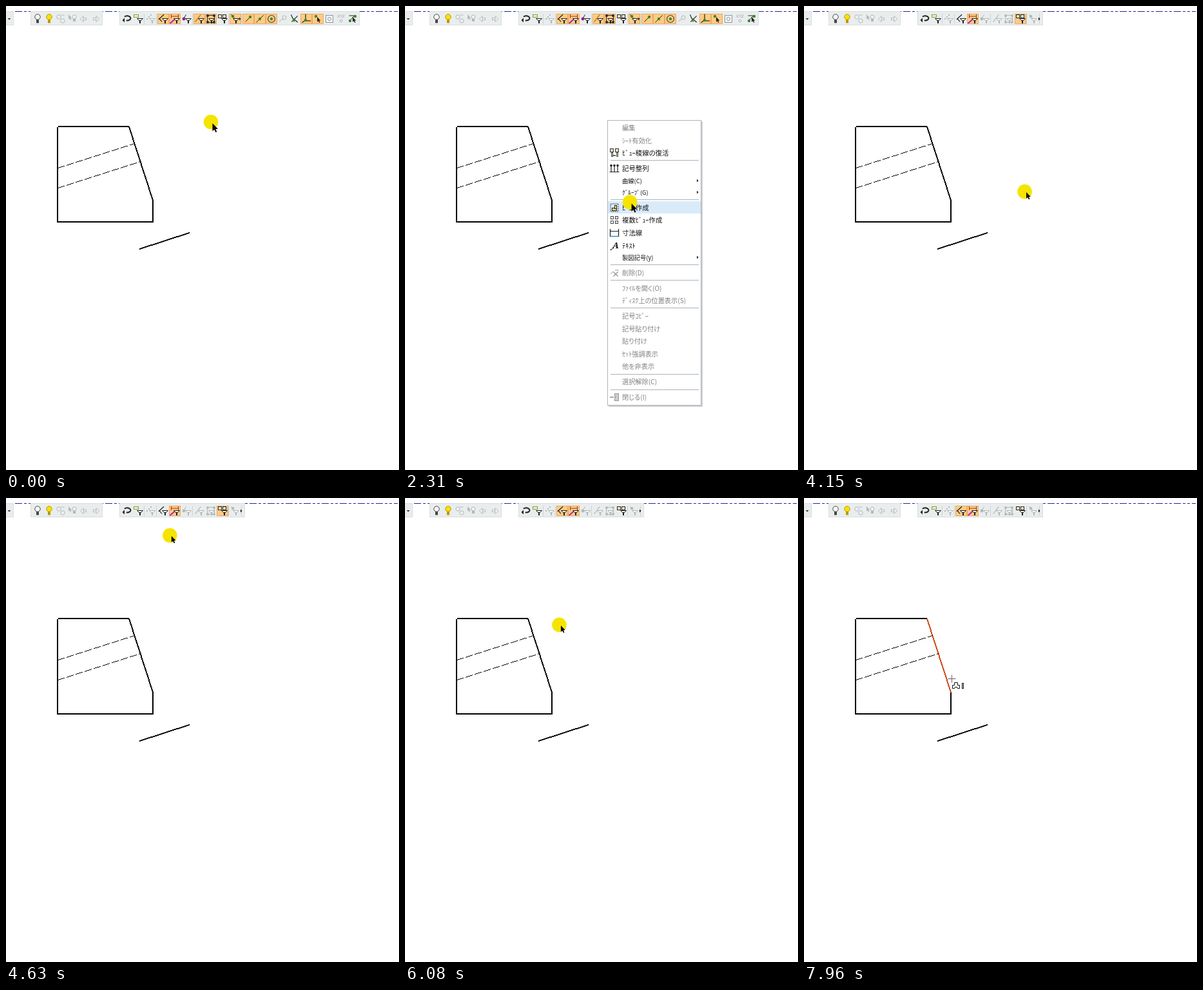
An HTML page with a canvas for the animation above (7990 ms loop, 610x720 px).

```html
<!DOCTYPE html>
<html lang="ja">
<head>
<meta charset="utf-8">
<style>
html, body { margin: 0; width: 100%; height: 100%; overflow: hidden; background: #fff; }
canvas { position: absolute; left: 0; top: 0; }
#menu { position: absolute; left: 314px; top: 177px; width: 144px; height: 441px; padding-top: 1px; box-sizing: content-box;
  background: #fff; border: 1px solid #aeb4ba; box-shadow: 2px 2px 0 #ccd0d3; height: 440px;
  font: 10.4px/19.6px "Noto Sans CJK JP", "Noto Sans CJK", sans-serif; font-feature-settings: "palt"; color: #111; }
#menu div { height: 19.6px; padding-left: 22px; white-space: pre; }
#menu .off { color: #808080; font-size: 10.2px; }
#menu .sub { height: 18.4px; line-height: 18.4px; font-size: 9.3px; }
#menu hr { width: 137px; height: 1px; margin: 1.6px 0 1.7px 4px; border: 0; background: #aab3bb; }
</style>
</head>
<body>
<canvas id="scene" width="610" height="720"></canvas>
<div id="menu"></div>
<canvas id="over" width="610" height="720"></canvas>
<script>
const $ = id => document.getElementById(id);
const scene = $('scene').getContext('2d'), over = $('over').getContext('2d'), menu = $('menu');
const LOOP = 7990, INK = '#222', GREY = '#b2b8b8', GREEN = '#3a8a28';
let g = scene;

// ---------- drawing helpers ----------
function box(x, y, w, h, fill, edge) {
  if (fill) { g.fillStyle = fill; g.fillRect(x, y, w, h); }
  if (edge) { g.strokeStyle = edge; g.lineWidth = 1; g.strokeRect(x + .5, y + .5, w - 1, h - 1); }
}
function disc(x, y, r, fill, edge, w = 1) {
  g.beginPath();
  g.arc(x, y, r, 0, 7);
  if (fill) { g.fillStyle = fill; g.fill(); }
  if (edge) { g.strokeStyle = edge; g.lineWidth = w; g.stroke(); }
}
// straight stroke centred on x, y; the angle is in degrees, rising to the right
function seg(x, y, len, deg, color, w = 1) {
  const a = deg * Math.PI / 180, dx = Math.cos(a) * len / 2, dy = -Math.sin(a) * len / 2;
  g.beginPath();
  g.moveTo(x - dx, y - dy);
  g.lineTo(x + dx, y + dy);
  g.strokeStyle = color; g.lineWidth = w; g.stroke();
}
// triangle pointing along (dx, dy)
function tri(x, y, r, dx, dy, fill, edge) {
  g.beginPath();
  g.moveTo(x + dx * r, y + dy * r);
  g.lineTo(x - dy * r, y + dx * r);
  g.lineTo(x + dy * r, y - dx * r);
  g.closePath();
  g.fillStyle = fill; g.fill();
  if (edge) { g.strokeStyle = edge; g.lineWidth = 1; g.stroke(); }
}
function arrow(x, y, s, fill, edge) {
  g.save();
  g.translate(x, y);
  g.scale(s, s);
  const p = new Path2D('M0 0V13L3 10.4L5.2 15L7.3 14L5.2 9.6L9 9.4Z');
  g.fillStyle = fill; g.fill(p);
  if (edge) { g.strokeStyle = edge; g.lineWidth = 1; g.stroke(p); }
  g.restore();
}
// hard-edged line, one step per pixel, optionally dashed
function stair(x0, y0, x1, y1, w, color, on = 1, period = 1) {
  const dx = x1 - x0, dy = y1 - y0, steep = Math.abs(dy) > Math.abs(dx);
  const n = Math.max(Math.abs(dx), Math.abs(dy)), back = w - 1;
  g.fillStyle = color;
  for (let i = 0; i <= n; i++) {
    if (i % period >= on) continue;
    const x = Math.round(x0 + dx * i / n), y = Math.round(y0 + dy * i / n);
    if (steep) g.fillRect(x - back, y, w, 1);
    else g.fillRect(x, y - back, 1, w);
  }
}

// ---------- toolbar icons, centred on x, 20 ----------
function funnel(x, c) {
  tri(x + 3, 19.5, 4.5, 0, 1, '#f6f6f0', c);
  seg(x + 3, 24.5, 5, 90, c, 2);
}
function bulb(x, fill, c, r = 4.2) {
  disc(x, 17, r, fill, c);
  box(x - 2, 17 + r, 4, r + 1, c);
}
const dot = (x, y, c) => disc(x, y, 2.2, c === GREY ? c : GREEN);
const frameBox = (x, y, s, c, fill) => box(x - s / 2, y - s / 2, s, s, fill, c);
function side(x, dir) {
  box(x - 4 + (dir < 0 ? 2 : 0), 18, 6, 4, '#f6f6f6', GREY);
  tri(x + dir, 20, 4.5, dir, 0, '#f6f6f6', GREY);
}
const icon = {
  bulb: x => bulb(x, '#f8fafa', '#444'),
  lit: x => bulb(x, '#ffe000', '#b59a00'),
  swap(x, c) { for (const d of [-3, 3]) disc(x + d, 20 + d, 3.2, '#eef0f0', c); seg(x + 3, 14, 5, 0, c); },
  pick(x, c) { arrow(x - 6, 13, .6, c); bulb(x + 3, '#f4f4f4', c, 3); },
  left: x => side(x, -1),
  right: x => side(x, 1),
  back(x, c) {
    g.beginPath();
    g.ellipse(x + 1, 19, 5.5, 3.5, 0, -2.4, 1.8);
    g.strokeStyle = c; g.lineWidth = 2; g.stroke();
    tri(x - 3, 22, 3.5, -1, 0, c);
  },
  tag(x, c) { box(x - 7, 13, 8, 5, '#f2f2c0', '#7f9a50'); funnel(x, c); },
  dots(x, c) { for (let i = 0; i < 3; i++) box(x - 6 + i * 3, 19 - i * 3, 2, 2, c); funnel(x, c); },
  line(x, c) { seg(x - 3, 17, 11, 42, c, 1.2); seg(x - 4, 22, 6, -50, c, 1.2); funnel(x, c); },
  dim(x, c) {
    seg(x, 16, 11, 0, '#a03010');
    for (const d of [-5.5, 5.5]) seg(x + d, 16, 6, 90, '#a03010');
    seg(x - 4, 24, 9, 40, '#b020c0', 2);
    funnel(x, c);
  },
  arc(x, c) { disc(x - 4, 20, 2.4, c === GREY ? c : '#a01890'); seg(x - 2, 16, 6, 60, c); funnel(x, c); },
  slash(x, c) { seg(x - 2, 19, 14, 52, c === GREY ? c : '#a07800', 1.2); funnel(x, c); },
  group(x, c) {
    frameBox(x, 20, 12, c);
    for (const a of [-5, 5]) for (const b of [-5, 5]) frameBox(x + a, 20 + b, 3, c, c);
    funnel(x - 2, c);
  },
  boxes(x, c) { for (const d of [-4, 3]) frameBox(x + d, 16, 6, c, '#f8edc4'); funnel(x, c); },
  point(x, c) {
    seg(x - 4, 16, 8, -45, c);
    dot(x - 4, 16, c);
    funnel(x - 2, c);
    if (c !== GREY) tri(x + 6, 20, 2.5, 1, 0, c);
  },
  end(x, c) { seg(x, 20, 13, 45, c); dot(x + 3, 17, c); },
  mid(x, c) { seg(x, 20, 16, 45, c); dot(x, 20, c); },
  ring(x, c) { disc(x, 20, 5.5, null, '#444', 1.2); dot(x, 20, c); },
  curve(x, c) { disc(x + 2, 18, 3, null, c); seg(x - 3, 22, 7, 30, c); },
  cross(x, c) { seg(x - 3, 19, 12, -65, c, 1.2); seg(x, 20, 13, 45, c, 1.2); seg(x + 2, 23, 7, -40, c, 1.2); dot(x - 1, 21, c); },
  axis(x, c) { seg(x - 1, 18, 11, 90, c, 1.2); seg(x + 3, 23, 8, 0, c, 1.2); seg(x - 4, 24, 6, 35, c, 1.2); dot(x - 1, 22, c); },
  near(x, c) { dot(x - 3, 16, c); arrow(x - 1, 17, .6, c); },
  frame(x) { frameBox(x, 20, 12, '#8f9696', '#f4f6f6'); disc(x, 20, 2.5, null, '#8f9696'); },
  xyz(x, c) {
    g.fillStyle = '#9a9f9f'; g.font = '6px "DejaVu Sans", sans-serif'; g.textAlign = 'center';
    g.fillText('XYZ', x, 18);
    disc(x, 23, 2, null, c);
  },
  many(x, c) { seg(x, 15, 11, 0, c); seg(x - 1, 19, 12, 45, c); dot(x + 4, 16, c); dot(x - 4, 23, c); arrow(x, 17, .6, c); }
};

// name:modes in the full and the short bar; 1 lit, 0 plain, - grey; | is a divider
const TOOLS = ('back:00 tag:00 | dots:-- | line:10 dim:11 arc:0- | slash:1- group:1- boxes:01 | point:1- | ' +
  'end:1 mid:1 ring:1 curve:- cross:0 axis:1 near:1 frame:0 xyz:- many:0').split(' ');

function strip(x, w) { box(x, 8, w, 22, '#e9eded', '#d9dede'); }

function toolbar(t) {
  const short = t >= 3400;
  g.setLineDash([11, 3, 4, 3, 4, 3]);
  seg(311, 8.5, 594, 0, '#2222a4');
  g.setLineDash([]);
  strip(-2, 14); strip(38, 112); strip(176, short ? 195 : 373);
  tri(5, 19, 2.5, 0, 1, '#333');
  ['bulb', 'lit', 'swap', 'pick', 'left', 'right'].forEach((n, i) => icon[n](49 + i * 18, GREY));
  let pos = 187;
  for (const tool of TOOLS) {
    if (tool === '|') {
      seg(Math.floor(pos) - 8.5, 20, 16, 90, '#cdd3d3');
      pos += 1.85;
      continue;
    }
    const [name, modes] = tool.split(':'), x = Math.floor(pos);
    let mode = modes[short ? 1 : 0];
    if (!mode) break;
    if (name === 'line' && t >= 5460) mode = '1';
    if (name === 'boxes' && t >= 5580) mode = '0';
    if (mode === '1') box(x - 9, 12, 18, 16, '#ffcb85', '#e8a961');
    else if (name === 'line' && t >= 5130) box(x - 8, 12, 17, 16, '#fde3bd', '#e8b884');
    icon[name](x, mode === '-' ? GREY : INK);
    pos += 18;
  }
  if (short) tri(364, 20, 2.5, 1, 0, '#111');
}

function drawing(t) {
  box(79, 188, 2, 148, '#000');
  box(81, 186, 110, 2, '#000');
  box(79, 334, 150, 2, '#000');
  box(227, 302, 2, 34, '#000');
  stair(191, 187, 228, 301, 2, t < 6930 ? '#000' : t < 7530 ? '#e0662a' : '#c94a16');
  stair(207, 377, 284, 352, 2, '#000');
  stair(80, 251, 199, 213, 1, '#000', 11, 14);
  stair(80, 282, 208, 241, 1, '#000', 11, 14);
}

// ---------- context menu: - disabled, > submenu, | rule ----------
const ITEMS = ('-編集 -ｼｰﾄ有効化 ﾋﾞｭｰ稜線の復活 | 記号整列 >曲線(C) >ｸﾞﾙｰﾌﾟ(G) | ﾋﾞｭｰ作成 複数ﾋﾞｭｰ作成 寸法線 ﾃｷｽﾄ >製図記号(y) | ' +
  '-削除(D) | -ﾌｧｲﾙを開く(O) -ﾃﾞｨｽｸ上の位置表示(S) | -記号ｺﾋﾟｰ -記号貼り付け -貼り付け -ｾｯﾄ強調表示 -他を非表示 | -選択解除(C) | -閉じる(I)').split(' ');

const menuIcon = {
  ﾋﾞｭｰ稜線の復活(y) {
    for (const x of [-4, 4]) { frameBox(x, y - 4, 6, '#333', '#e8e0d0'); box(x - 1, y - 1, 3, 7, '#bbb', '#555'); }
    seg(0, y + 4, 4, 0, GREEN, 2);
  },
  記号整列(y) {
    for (const x of [-5, 0, 5]) { seg(x, y + 1, 10, 90, INK, 1.2); disc(x, y - 4.5, 1.8, INK); }
    seg(0, y + 5.5, 15, 0, INK);
  },
  ﾋﾞｭｰ作成(y) {
    g.setLineDash([2, 1]);
    frameBox(0, y, 13, '#444');
    g.setLineDash([]);
    box(-4, y, 8, 5, '#f1d58c', INK);
    box(0, y - 4, 4, 6, '#f1d58c', INK);
  },
  複数ﾋﾞｭｰ作成(y) {
    for (const a of [-3.5, 3.5]) for (const b of [-3.5, 3.5]) frameBox(a, y + b, 5, '#444');
  },
  寸法線(y) {
    for (const x of [-6.5, 6.5]) seg(x, y, 12, 90, INK, 1.3);
    seg(0, y - 2.5, 12, 0, INK);
    seg(0, y + 5.5, 13, 0, '#3a8fc0', 1.5);
  },
  ﾃｷｽﾄ(y) {
    g.fillStyle = '#111'; g.font = 'italic bold 13px "Noto Serif", serif';
    g.fillText('A', -3, y + 4);
    seg(-4, y + 5.5, 5, 45, INK);
    tri(-5, y + 6, 1.5, -1, 0, INK);
  },
  '削除(D)'(y) { for (const d of [-45, 45]) seg(2, y + 2, 10, d, '#999', 1.5); seg(-4, y, 6, 45, '#999'); seg(4, y - 4, 6, 0, '#999'); },
  '閉じる(I)'(y) { box(0, y - 6, 7, 12, '#ccc', '#999'); seg(-4, y, 6, 0, '#aaa', 2); tri(0, y, 3, 1, 0, '#aaa'); }
};

const rows = [];
function buildMenu() {
  for (const item of ITEMS) {
    const el = document.createElement(item === '|' ? 'hr' : 'div');
    menu.append(el);
    if (item === '|') continue;
    el.textContent = item.replace(/^[->]/, '');
    el.className = item[0] === '-' ? 'off' : item[0] === '>' ? 'sub' : '';
    rows.push(el);
  }
  const art = document.createElement('canvas');
  art.width = 146; art.height = 444;
  menu.append(art);
  g = art.getContext('2d');
  g.translate(10, 0);
  for (const el of rows) {
    const y = Math.round(el.offsetTop + el.offsetHeight / 2);
    if (el.className === 'sub') tri(128, y, 2.5, 1, 0, INK);
    menuIcon[el.textContent]?.(y);
  }
}

function showMenu(t, tipY) {
  const on = t >= 1130 && t < 3230;
  menu.style.opacity = on ? Math.min(1, (Math.floor((t - 1130) / 45) + 1) / 3) : 0;
  for (const el of rows) {
    const d = tipY - 178 - el.offsetTop;
    const under = t > 2160 && d >= 0 && d < el.offsetHeight;
    el.style.background = under ? (t < 2670 ? '#d9ebf9' : '#c5e1f6') : '';
  }
}

// ---------- pointer ----------
const between = (t, a, b) => t >= a && t < b;
// start, end, target x, y, sideways bow
const MOVES = [
  [2160, 2340, 350, 308, 0],
  [3820, 3950, 346, 297, 0],
  [4137, 4930, 239, 18, 0],
  [5760, 6410, 224, 259, 16],
  [6550, 6970, 219, 273, 0]
];
function place(t) {
  let x = 318, y = 180;
  for (const [start, end, tx, ty, bow] of MOVES) {
    const u = Math.min(1, Math.max(0, (t - start) / (end - start))), e = u * (2 - u);
    x += (tx - x) * e + bow * Math.sin(Math.PI * e);
    y += (ty - y) * e;
  }
  return [x, y];
}

function ripple(t, start, hold, len, x, y, r0, r1, color) {
  if (!between(t, start, start + hold + len)) return;
  const u = (t - start - hold) / len;
  if (u <= 0) disc(x, y, r0, color);
  else disc(x, y, r0 + (r1 - r0) * u, null, color, 2);
}

function crosshair(x, y) {
  for (const a of [0, 90]) seg(x + .5, y + .5, 12, a, '#667');
  g.save();
  g.translate(x + 1.5, y + 6.5);
  const p = new Path2D('M0 9V4H3V0H8V4H11V9H8L7 7H4L3 9Z');
  g.fillStyle = '#fff'; g.fill(p);
  g.strokeStyle = '#111'; g.lineWidth = 1; g.stroke(p);
  g.restore();
  box(x + 16, y + 7, 3, 9, '#ddd', '#111');
}

function pointer(t, x, y) {
  const halo = t < 830 || between(t, 2160, 2670) || between(t, 3550, 5330) || between(t, 5580, 7300);
  if (halo) disc(x, y, 11.3, '#f5e400');
  if (t >= 7730) return t < 7960 ? crosshair(227, 281) : crosshair(229, 280);
  const early = t < 3230;
  if (y < 32) arrow(x + 2.5, y + 1.5, 1, '#fff', INK);
  else arrow(x + 2.5, y + (early ? 2 : 1), early ? .94 : .75, '#000');
  ripple(t, 1880, 130, 150, 319, 181, 3, 19, '#1010f0');
  ripple(t, 3230, 60, 180, 350, 308.5, 1.2, 11, '#f02020');
  ripple(t, 5460, 60, 60, 240, 18, 1.5, 11, '#f02020');
}

let begin;
function tick(now) {
  begin ??= now;
  const t = Math.max(0, now - begin) % LOOP, [x, y] = place(t);
  g = scene;
  g.clearRect(0, 0, 610, 720);
  toolbar(t);
  drawing(t);
  showMenu(t, y + 4);
  g = over;
  g.clearRect(0, 0, 610, 720);
  pointer(t, x, y);
  requestAnimationFrame(tick);
}
// the halo lets dark lines show through
$('over').style.mixBlendMode = 'normal';
buildMenu();
requestAnimationFrame(tick);
</script>
</body>
</html>
```
